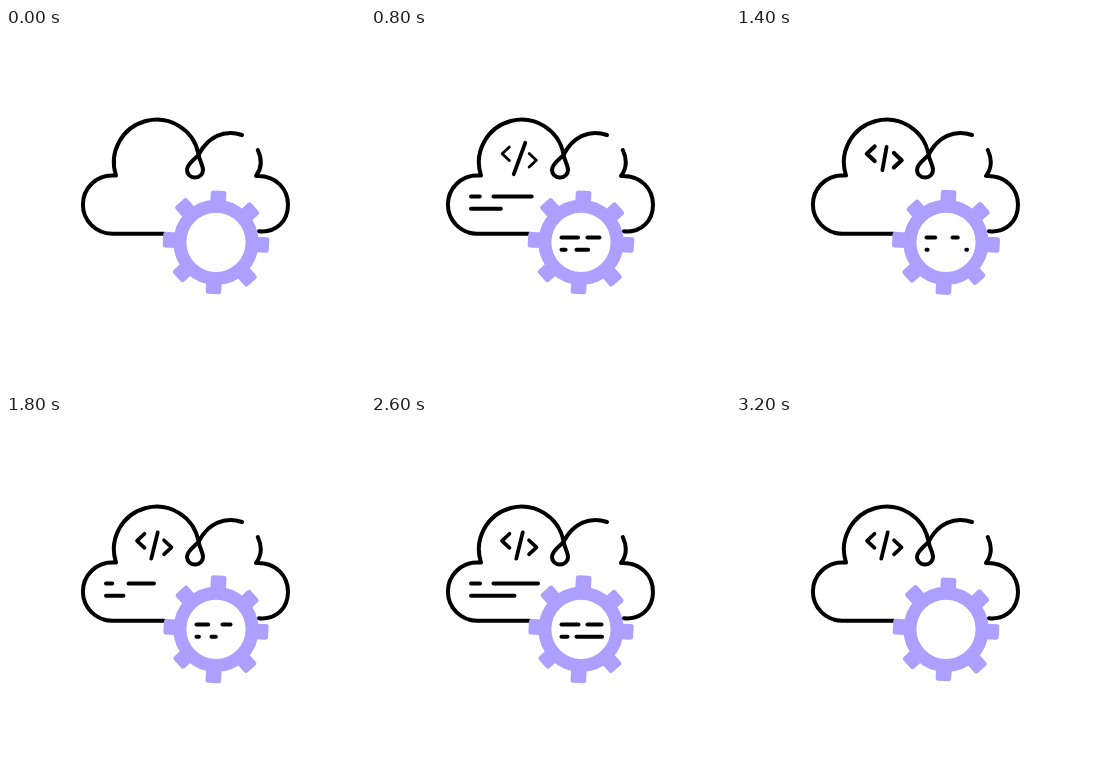
Write an HTML page that moves like this. It is 359x359 px and loops after 3230 ms.

```html
<!DOCTYPE html>
<html lang="en">
<head>
<meta charset="utf-8">
<title>Cloud code</title>
<style>
  html, body { margin: 0; width: 100%; height: 100%; overflow: hidden; background: #fff; }
  svg { display: block; width: 100%; height: 100%; }
  .ink { fill: none; stroke: #000; stroke-linecap: round; stroke-linejoin: round; }
</style>
</head>
<body>
<svg viewBox="0 0 359 359">
  <g class="ink" stroke-width="4">
    <path d="M236 107C218 101 202 109 193 126C190 131 181 135 181 142A8 7.6 0 0 0 197 142C197 137 193 132 192.5 126A42.7 42.7 0 1 0 110 147.5H106A29.1 29.1 0 0 0 106 205.7H158"/>
    <path d="M251.8 122C256 131 256 140 250 148C270 147 282 161 282 177C282 193 270 205 253 203.3"/>
  </g>
  <g id="gear" fill="#ad9ffd">
    <circle r="36.1" fill="#fff" stroke="#ad9ffd" stroke-width="13"/>
  </g>
  <g class="ink">
    <path id="left" d="M3.5-7L-4 0L3.5 7"/>
    <path id="right" d="M-3.5-7L4 0L-3.5 7"/>
    <path id="slash"/>
  </g>
  <g id="lines" class="ink" stroke-width="4"></g>
</svg>
<script>
const LOOP = 3230;
const TURN = 9; // degrees per step
const $ = id => document.getElementById(id);
const ramp = (t, from, length) => Math.min(1, Math.max(0, (t - from) / length));

function add(parent, tag, attrs) {
  const el = document.createElementNS('http://www.w3.org/2000/svg', tag);
  for (const key in attrs) el.setAttribute(key, attrs[key]);
  return parent.appendChild(el);
}

// Teeth differ slightly in reach, opposite ones match
for (let i = 0; i < 8; i++) {
  const reach = 51.7 + 0.7 * (i % 4);
  add($('gear'), 'rect', {
    x: -7.8, y: -reach, width: 15.6, height: reach - 38, rx: 2.5,
    transform: `rotate(${3 + i * 45})`
  });
}

// Rows of dashes given by their lengths; eraseAt staggers the removal
const lines = [];
function addRows(x, y, gap, rows, eraseAt) {
  rows.forEach((lengths, row) => {
    let start = x;
    lengths.forEach((length, i) => {
      lines.push({
        x: start, length, y: y + 12.3 * row,
        drawAt: 460 + 100 * row + 40 * i * (row + 1),
        eraseAt: eraseAt(row, i),
        forward: row > 0 && i > 0,
        el: add($('lines'), 'path', {})
      });
      start += length + gap;
    });
  });
}
addRows(100, 168.5, 13.5, [[9, 44.5], [43.5]], () => 1040);
addRows(190.5, 209.5, 9, [[17, 14], [6, 25.5]], (row, i) => 1230 - 120 * row - 50 * i);

function drawLine({ x, length, y, drawAt, eraseAt, forward, el }, t) {
  const second = t >= 1600;
  const drawn = ramp(second ? t - 1100 : t, drawAt, 350);
  const erased = ramp(second ? t - 1600 : t, eraseAt, 350);
  const from = forward ? erased : 0;
  const to = forward ? drawn : Math.min(drawn, 1 - erased);
  const visible = drawn > 0 && erased < 1;
  el.setAttribute('d', visible ? `M${x + length * from} ${y}H${x + length * to + 0.01}` : '');
}

function drawBracket(id, x, y, start, t, wave) {
  const size = ramp(t, start, 220) * (1 - 0.04 * wave);
  const el = $(id);
  el.setAttribute('transform', `translate(${x} ${y}) scale(${size})`);
  el.setAttribute('stroke-width', size ? 3.5 - 0.6 * wave : 0);
}

function drawCode(t) {
  const wave = Math.cos(2 * Math.PI * (t - 800) / 1400);
  drawBracket('left', 135, 125.8, 80, t, wave);
  drawBracket('right', 161.5, 132.3, 140, t, wave);

  const grow = ramp(t, 240, 400);
  const width = 3.8 * Math.sqrt(grow);
  const half = Math.max(0, (32 + 5.2 * wave) * grow - width) / 2;
  const slash = $('slash');
  slash.setAttribute('d', half ? `M0 ${-half}V${half}` : '');
  slash.setAttribute('stroke-width', width);
  slash.setAttribute('transform', `translate(148.5 130.5) rotate(${15 + 5.2 * wave})`);
}

// Five steps every 200 ms, the first held for two ticks of 1/30 s
function stepAt(ms) {
  const tick = Math.floor((ms % 200 + 4) * 0.03);
  return Math.floor(ms / 200) * 5 + Math.min(4, Math.max(0, tick - 1));
}

const begin = performance.now();
function render() {
  const step = stepAt((performance.now() - begin) % LOOP);
  const t = step * 40;
  $('gear').setAttribute('transform', `translate(210 214.3) rotate(${step * TURN})`);
  drawCode(t);
  lines.forEach(line => drawLine(line, t));
  requestAnimationFrame(render);
}
render();
</script>
</body>
</html>
```
